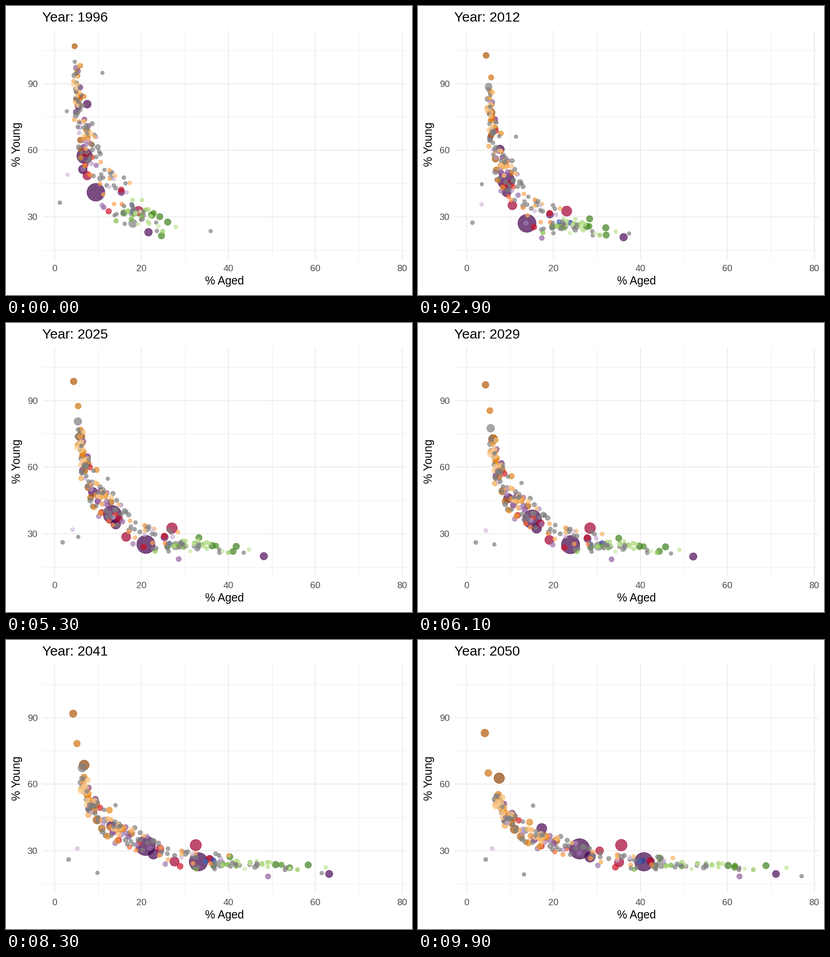
A matplotlib script that plays this animation: 885x632 px, repeating every 10000 ms.

```python
import numpy as np
import matplotlib.pyplot as plt
from matplotlib.animation import FuncAnimation
from matplotlib.colors import to_rgb

W, H, DPI = 885, 632, 100
FRAMES, INTERVAL = 100, 100
PX = 72 / DPI  # points per pixel
EDGE = 0.9     # outline, px
ALPHA = 0.7
S = np.linspace(0, 1, FRAMES)

# Small populations are pale, large ones dark.
PALETTE = {
    "africa": ["#FEE0B6", "#FDB863", "#E08214", "#B35806", "#7F3B08"],
    "asia": ["#E7D4E8", "#C2A5CF", "#9970AB", "#762A83", "#40004B"],
    "america": ["#FED98E", "#FDA04E", "#F4572F", "#D01525", "#A30030"],
    "europe": ["#DDF1C2", "#B8E186", "#7FBC41", "#4D9221", "#276419"],
    "oceania": ["#92C5DE", "#4F90C0", "#3A4FA0", "#313695", "#20205F"],
    "other": ["#7F7F7F"] * 5,
}
GROWTH = dict(africa=1.4, asia=1.12, america=1.08, europe=0.98, oceania=1.15, other=1.08)
dots = []


def shade(region, radius):
    level = np.interp(radius, [4.3, 4.9, 5.5, 6.4, 9.8], range(5))
    rgb = np.array([to_rgb(c) for c in PALETTE[region]])
    return [np.interp(level, range(5), rgb[:, k]) for k in range(3)]


def add(region, r, x, y, growth=None):
    growth = growth or GROWTH[region]
    dots.append((shade(region, r), r * (1 + (growth - 1) * S), x, y))


def track(region, r, x, y, rise=1.7, fall=2.0, growth=None):
    """x climbs as S**rise, y decays as (1 - S)**fall between two end values."""
    add(region, r, x[0] + (x[1] - x[0]) * S ** rise,
        y[1] + (y[0] - y[1]) * (1 - S) ** fall, growth)


def ageing(u):
    """Shared path of a country that is a fraction u along the transition."""
    young = np.clip(1 - u, 0, 1)
    x0, x1 = 5 + 18 * u ** 2.2, 7 + 54 * u ** 1.7
    early = S ** 0.4
    x = x0 + (x1 - x0) * S ** 1.6
    y = 27 - 4 * early + (65 - 34 * S ** 1.35) * young ** (1.15 + 0.85 * early)
    return x, y


def add_landmarks():
    track("asia", 20, (9.5, 40.8), (41, 25), 1.6, 6, 1.04)
    track("asia", 17.5, (6.9, 26), (57.4, 30.8), 1.75, 1.6, 1.31)
    track("asia", 10, (6.5, 28.4), (51.3, 27.2), 1.7, 1.6, 1.2)
    track("asia", 9.2, (7.5, 17.3), (80.7, 40), 3.2, 2, 1.25)
    track("asia", 9, (21.6, 71.2), (23, 19.5), 1, 3, 0.93)
    track("asia", 5.7, (11.3, 62.8), (34.2, 18.4), 1.75, 6)
    track("asia", 4.6, (3, 5.9), (48.9, 31), 1.5, 4)
    track("america", 11, (19.3, 35.6), (32.5, 32.5), 1.2, 1, 1.2)
    track("america", 10, (7.5, 35.1), (48.5, 24.8), 1.8, 2.4)
    track("america", 8.5, (7.2, 30.6), (58.6, 30), 1.8, 1.9)
    track("africa", 6.4, (4.6, 4.2), (106.8, 83), 1, 0.55)
    track("africa", 5.8, (5.9, 5), (98, 65), 1, 0.5)
    track("africa", 8.6, (5.5, 7.5), (80.2, 62.7), 2.5, 0.6)
    track("europe", 7.5, (24.6, 61.7), (21.4, 22.5), 1.3, 1)
    track("europe", 7.5, (24.2, 44.5), (30, 26.7), 1.3, 1)
    track("oceania", 5.3, (17.8, 39.8), (35.2, 25.2), 1.5, 4)
    track("oceania", 6, (18, 40.5), (32.5, 25.5), 1.1, 4)
    track("other", 7.2, (5, 7.3), (97, 52.4), 3, 0.6, 1.42)
    track("other", 9.5, (18, 44.8), (27, 24), 1.6, 2)
    track("other", 4.7, (1.2, 4.4), (36.3, 26), 2.6, 6)
    track("other", 4.4, (35.9, 77.1), (23.5, 18.5), 2.7, 0.7)
    track("other", 4.3, (2.8, 13.2), (77.5, 19.3), 2.2, 2.4)
    track("other", 4.4, (11, 15.3), (94.8, 50.3), 2, 3)


def add_crowd():
    rng = np.random.default_rng(12)
    groups = [("africa", 36, 0, 0.4, 0.9), ("asia", 24, 0.1, 0.8, 1.2),
              ("america", 20, 0.2, 0.8, 0.8), ("europe", 24, 0.8, 1.04, 1.1),
              ("other", 72, 0, 1, 0.5)]
    for region, count, lo, hi, spread in groups:
        for u in rng.uniform(lo, hi, count):
            nx, ny = np.clip(rng.normal(size=2), -1.8, 1.8)
            x, y = ageing(u)
            r = 4.5 + min(rng.exponential(spread), 3.5)
            add(region, r, x * (1 + 0.11 * nx), y * (1 + (0.1 - 0.05 * S) * ny))


def sx(v):
    return 106 + 9.47 * v


def sy(v):
    return 606.3 - 4.853 * v


plt.rcParams["font.family"] = "Liberation Sans"
fig = plt.figure(figsize=(W / DPI, H / DPI), dpi=DPI, facecolor="white")
ax = fig.add_axes([0, 0, 1, 1])
ax.set(xlim=(0, W), ylim=(H, 0))
ax.axis("off")


def label(x, y, text, size, color="black", **kw):
    return ax.text(x, y, text, fontsize=size * PX, color=color, va="baseline", **kw)


def grid(xvals, yvals, width):
    style = dict(colors="#EBEBEB", linewidths=width * PX, zorder=1)
    ax.vlines(sx(np.array(xvals)), 52.5, 553.5, **style)
    ax.hlines(sy(np.array(yvals)), 79.5, 873, **style)


grid(range(10, 80, 20), range(15, 106, 30), 1)
grid(range(0, 81, 20), range(30, 91, 30), 2)
for v in range(0, 81, 20):
    label(sx(v), 580, str(v), 20, "#4D4D4D", ha="center")
for v in range(30, 91, 30):
    label(69, sy(v) + 7, str(v), 20, "#4D4D4D", ha="right")
label(476, 609.5, "% Aged", 24.6, ha="center")
label(31.5, 302.5, "% Young", 24.6, ha="center", rotation=90, rotation_mode="anchor")
title = label(79, 34, "", 29.9)

add_landmarks()
add_crowd()
dots.sort(key=lambda d: -d[1][0])  # large bubbles at the back
colors = [(*d[0], ALPHA) for d in dots]
radii, xpos, ypos = (np.array([d[k] for d in dots]) for k in (1, 2, 3))
bubbles = ax.scatter(sx(xpos[:, 0]), sy(ypos[:, 0]), facecolors=colors, edgecolors=colors,
                     linewidths=EDGE * PX, zorder=2)


def draw(i):
    bubbles.set_offsets(np.column_stack([sx(xpos[:, i]), sy(ypos[:, i])]))
    bubbles.set_sizes(((2 * radii[:, i] - EDGE) * PX) ** 2)
    title.set_text(f"Year: {round(1996 + 54 * S[i])}")
    return bubbles, title


anim = FuncAnimation(fig, draw, frames=FRAMES, interval=INTERVAL, repeat=True,
                     repeat_delay=0, blit=False)
plt.show()
```
